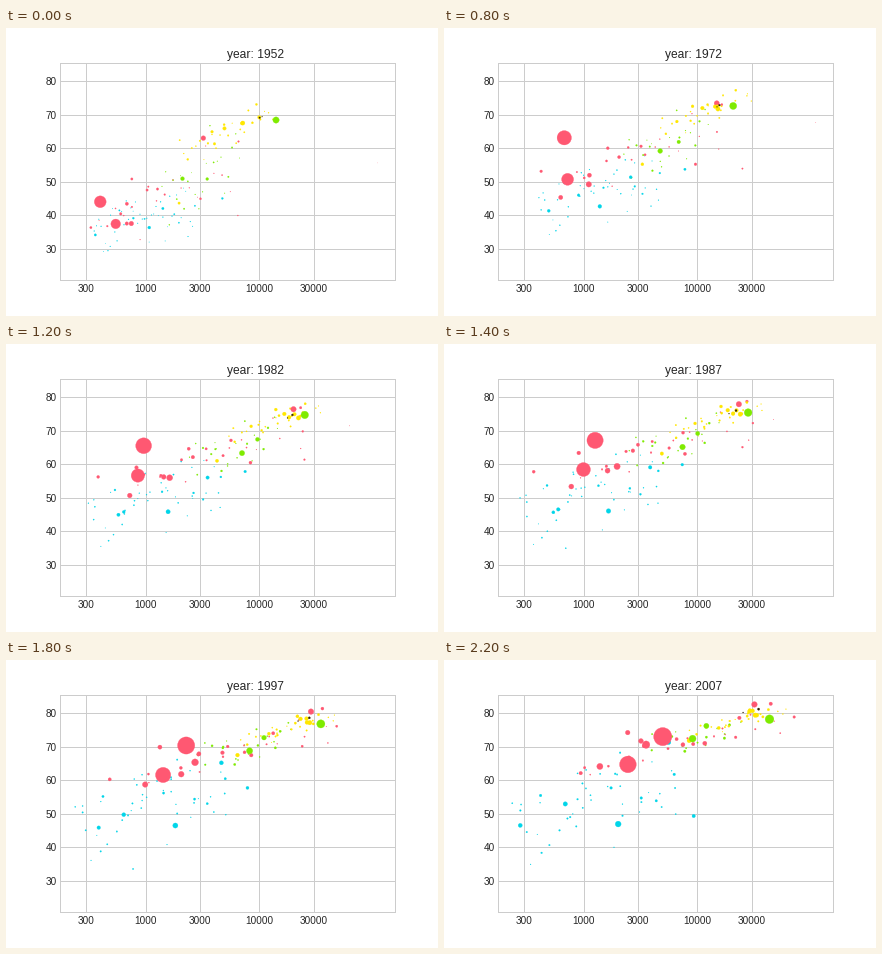
Animation of 432x288 px, one loop 2.4 s. Source, as a matplotlib script:

```python
import matplotlib.pyplot as plt
import numpy as np
from matplotlib.animation import FuncAnimation
from matplotlib.ticker import NullLocator

STEPS = 12
GREY, INK = "0.8", "0.15"
AFRICA, AMERICAS, ASIA = "#00d5e9", "#7feb00", "#ff5872"
EUROPE, OCEANIA = "#ffe700", "#332200"

# Steps at which a path's points are reached, by number of points
KEYS = {2: [0, 11], 3: [0, 6, 11], 4: [0, 4, 8, 11], 7: [0, 2, 4, 6, 8, 10, 11]}

rng = np.random.default_rng(7)
colors, sizes, wealth, life = [], [], [], []


def path(*points):
    return np.interp(range(STEPS), KEYS[len(points)], points)


def log_path(*points):
    return 10 ** path(*np.log10(points))


def add(color, people, gdp, age):
    """People are in millions."""
    colors.append(color)
    sizes.append(people / 4)
    wealth.append(gdp)
    life.append(age)


def dot(color, people, gdp, age):
    add(color, log_path(*people), log_path(*gdp), path(*age))


def crowd(color, count, people, gdp, spread, age, slope, scatter):
    """Small dots that drift along with a trend, each at its own offset."""
    for rank in np.linspace(-1.7, 1.7, count):
        size, drift, a, b = rng.normal(size=4).clip(-1.8, 1.8)
        rich = rank + path(0, 0.3 * drift)
        lift = path(a, 0.8 * a + 0.5 * b)
        add(
            color,
            log_path(*people) * np.exp(min(0.9 * size, 1)),
            log_path(*gdp) * 10 ** (path(*spread) * rich),
            path(*age) + path(*slope) * rich + path(*scatter) * lift,
        )


crowd(AFRICA, 45, [2.8, 9.5], [980, 1420, 1160, 1450], [.26, .41],
      [39, 47.5, 53.6, 54.8], [1.5, 3.5], [4.3, 7])
crowd(AMERICAS, 22, [3, 9], [3050, 5300, 6600, 9000], [.2, .23],
      [53, 62.4, 69.6, 73.6], [5, 2], [6.5, 2.5])
crowd(ASIA, 18, [4, 17], [1600, 3600, 6500, 8500], [.36, .5],
      [47, 59, 68, 71.5], [5, 4.5], [6, 3])
crowd(EUROPE, 24, [6, 8], [5100, 12000, 16500, 24000], [.24, .23],
      [64.5, 71, 74.5, 78], [4, 2], [2.6, 1])

dot(AFRICA, [22, 80], [1419, 3504, 5581], [42, 56, 71.3])
dot(AFRICA, [33, 135], [1077, 1577, 2014], [36.3, 45.8, 46.9])
dot(AFRICA, [21, 76], [362, 578, 691], [34.1, 44.9, 52.9])
dot(AFRICA, [14, 65], [781, 904, 458, 278], [39.1, 46, 45.5, 46.5])
dot(AFRICA, [14, 44], [4725, 7766, 7225, 9270], [45, 53.7, 61.9, 49.3])
dot(AFRICA, [2.5, 9], [493, 591, 737, 863], [40, 43, 44.6, 46.2, 23.6, 43.4, 46.2])

dot(ASIA, [47, 150], [684, 630, 838, 1391], [37.5, 45.3, 56, 64.1])
dot(ASIA, [556, 1000, 1319], [400, 488, 677, 962, 1656, 3119, 4959],
    [44, 44.5, 63.1, 65.5, 68.7, 72, 73])
dot(ASIA, [372, 708, 1110], [547, 658, 724, 856, 1164, 1747, 2452],
    [37.4, 43.6, 50.7, 56.6, 60.2, 62.9, 64.7])
dot(ASIA, [82, 223], [750, 1111, 2383, 3541], [37.5, 49.2, 62.7, 70.6])
dot(ASIA, [17, 69], [3035, 9614, 7236, 11606], [44.9, 55.2, 65.7, 71])
dot(ASIA, [86, 118, 127], [3217, 14779, 26825, 31656], [63, 73.4, 79.4, 82.6])
dot(ASIA, [21, 49], [1031, 5623, 23348], [47.5, 67.1, 78.6])
dot(ASIA, [.16, 2.5], [108382, 109348, 34933, 47307], [55.6, 67.7, 75.2, 77.6])
dot(ASIA, [20, 48], [331, 424, 347, 944], [36.3, 53.1, 59.3, 62.1])
dot(ASIA, [41, 169], [685, 1443, 2606], [43.4, 56.2, 65.5])
dot(ASIA, [22, 91], [1273, 2603, 3190], [47.8, 62.1, 71.7])
dot(ASIA, [4, 28], [6460, 24837, 24842, 21655], [39.9, 53.9, 68.8, 72.8])
dot(ASIA, [21, 65], [758, 2393, 7458], [50.8, 64.6, 70.6])
dot(ASIA, [26, 85], [605, 700, 989, 2442], [40.4, 50.3, 67.7, 74.2])

dot(EUROPE, [42, 61], [7030, 20294, 30470], [67.4, 74.9, 80.7])
dot(EUROPE, [69, 82], [7144, 22032, 32170], [67.5, 73.8, 79.4])
dot(EUROPE, [48, 58], [4931, 16537, 28570], [65.9, 75, 80.5])
dot(EUROPE, [26, 38], [4029, 8452, 15390], [61.3, 71.3, 75.6])
dot(EUROPE, [28, 40], [3834, 13926, 28821], [64.9, 76.3, 80.9])
dot(EUROPE, [22, 71], [1969, 4241, 8458], [43.6, 61, 71.8])
dot(EUROPE, [50, 61], [9980, 18232, 33203], [69.2, 74, 79.4])

dot(AMERICAS, [57, 190], [2109, 7031, 9066], [50.9, 63.3, 72.4])
dot(AMERICAS, [30, 109], [3478, 9611, 11978], [50.8, 67.4, 76.2])
dot(AMERICAS, [158, 301], [13990, 25010, 42952], [68.4, 74.7, 78.2])

dot(OCEANIA, [9, 20], [10040, 19477, 34435], [69.1, 74.7, 81.2])
dot(OCEANIA, [2, 4], [10557, 17632, 25185], [69.4, 73.8, 80.2])

sizes, wealth, life = map(np.array, (sizes, wealth, life))

plt.rcParams["font.family"] = "Liberation Sans"
fig = plt.figure(figsize=(6, 4), dpi=72, facecolor="white")
fig.subplots_adjust(left=0.125, right=0.9, bottom=0.125, top=0.88)
ax = fig.add_subplot()
ax.set_xscale("log")
ax.set_xlim(10 ** 2.2487, 10 ** 5.1887)
ax.set_ylim(20.649, 85.553)
ticks = [300, 1000, 3000, 10000, 30000]
ax.set_xticks(ticks, [str(t) for t in ticks])
ax.xaxis.set_minor_locator(NullLocator())
ax.set_yticks(range(30, 90, 10))
ax.tick_params(length=0, pad=3.5, labelsize=10, labelcolor=INK)
ax.set_axisbelow(True)
ax.grid(color=GREY, linewidth=1)
for spine in ax.spines.values():
    spine.set(color=GREY, linewidth=1)

dots = ax.scatter(wealth[:, 0], life[:, 0], s=sizes[:, 0], c=colors, linewidths=0.3)
title = ax.text(0.5, 1.02, "", transform=ax.transAxes, fontsize=12, color=INK)


def draw(i):
    dots.set_offsets(np.column_stack([wealth[:, i], life[:, i]]))
    dots.set_sizes(sizes[:, i])
    title.set_text(f"year: {1952 + 5 * i}")
    return dots, title


anim = FuncAnimation(fig, draw, frames=STEPS, interval=200, repeat=True, repeat_delay=0)
plt.show()
```
